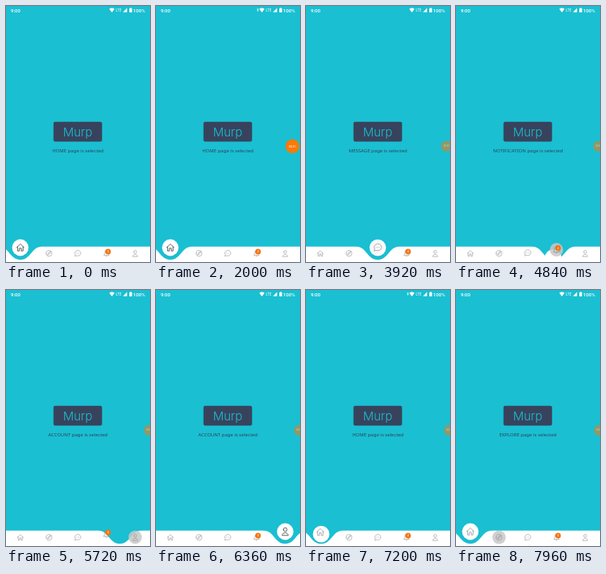
Recreate the animation shown at these times as an HTML page. Size 181 by 320 pixels, loop 8000 ms.

```html
<!DOCTYPE html>
<html lang="en">
<head>
<meta charset="utf-8">
<style>
  html, body { margin: 0; width: 100%; height: 100%; overflow: hidden; background: #1abfd2; }
  svg { display: block; width: 181px; height: 320px; }
  text { text-anchor: middle; }
  .status { font-family: Roboto, sans-serif; font-weight: 500; font-size: 6.2px; fill: #fff; }
  .status .network { font-size: 4.6px; font-weight: 400; }
  .icon { fill: none; stroke-linejoin: round; stroke-linecap: round; }
</style>
</head>
<body>
<svg viewBox="0 0 181 320">
  <defs>
    <filter id="shadow" x="-30%" y="-30%" width="160%" height="160%">
      <feDropShadow dx="0" dy=".5" stdDeviation=".6" flood-opacity=".22"/>
    </filter>
  </defs>
  <rect width="181" height="320" fill="#1abfd2"/>

  <g class="status">
    <text x="12" y="7.6">9:00</text>
    <path id="extra" d="M127 3.8l1.8 2-.9 1V2.8l.9 1-1.8 2" fill="none" stroke="#fff" stroke-width=".5"/>
    <path d="M129.8 3.7Q133.1 1.4 136.4 3.7L133.1 7.9Z"/>
    <text class="network" x="141.6" y="7.2">LTE</text>
    <path d="M147 7.7H152.2V2.4Z"/>
    <path d="M155 3h.9v-.8h1.6v.8h.9v4.9h-3.4Z"/>
    <text x="167.3" y="7.6">100%</text>
  </g>

  <rect x="59.7" y="144.8" width="61" height="24.6" rx="2" fill="#37435c"/>
  <text x="90.2" y="162.5" font-family="Inter, sans-serif" font-size="15" font-weight="300" fill="#1abfd2">Murp</text>
  <text id="label" x="90.4" y="183.3" font-family="Noto Sans, sans-serif" font-size="6" fill="#2d4458"></text>

  <path id="bar" fill="#fff"/>
  <g id="cells"></g>

  <g id="bubble">
    <circle r="8.8" fill="#fb7a08"/>
    <text id="timer" y="1.3" font-family="Roboto, sans-serif" font-size="3.7" fill="#fff"></text>
  </g>
</svg>
<script>
const LOOP = 8000;
const DP = 0.44;
const BASE = 300.8;
const PAGES = ['HOME', 'EXPLORE', 'MESSAGE', 'NOTIFICATION', 'ACCOUNT'];
const ICONS = [
  'M-4.7 .3L0-4.4 4.7 .3M-3.4-.9V4.4H-1.2V1H1.2V4.4H3.4V-.9',
  'M-4.6 0a4.6 4.6 0 1 0 9.2 0a4.6 4.6 0 1 0-9.2 0M2.5-2.5L.9.9-2.5 2.5-.9-.9Z',
  'M-4.4 4.2L-3.9 2A4.7 4.3 0 1 1-1.8 3.7ZM-2.1-.2h.1M0-.2h.1M2-.2h.1',
  'M-3.9 2.8C-2.6 1.6-2.9-.4-2.6-1.6A2.6 2.8 0 0 1 2.6-1.6C2.9-.4 2.6 1.6 3.9 2.8ZM-1 4a1.1 1.1 0 0 0 2 0',
  'M-2.2-2.3a2.2 2.4 0 1 0 4.4 0a2.2 2.4 0 1 0-4.4 0M-3.8 4.6C-3.8 .6 3.8 .6 3.8 4.6Z'
];
// [click time, page]
const CLICKS = [[-5000, 0], [2230, 1], [3620, 2], [4680, 3], [5637, 4], [6715, 0], [7960, 1]];

const $ = id => document.getElementById(id);
const clamp = v => Math.min(1, Math.max(0, v));
const mix = (a, b, f) => a + (b - a) * f;
const cellX = i => 18 + 36.1 * i;

function set(node, attrs) {
  for (const key in attrs) node.setAttribute(key, attrs[key]);
}
function add(parent, tag, attrs) {
  const node = document.createElementNS('http://www.w3.org/2000/svg', tag);
  set(node, attrs);
  return parent.appendChild(node);
}

// cubic-bezier(.4, 0, .2, 1)
function fastOutSlowIn(t) {
  t = clamp(t);
  if (t === 0 || t === 1) return t;
  let lo = 0, hi = 1, u;
  for (let n = 0; n < 22; n++) {
    u = (lo + hi) / 2;
    const x = 1.2 * u * (1 - u) ** 2 + 0.6 * u * u * (1 - u) + u ** 3;
    if (x < t) lo = u; else hi = u;
  }
  return u * u * (3 - 2 * u);
}
const accelDecel = t => (1 - Math.cos(Math.PI * clamp(t))) / 2;

const cells = ICONS.map((d, i) => {
  const circle = add($('cells'), 'circle', { r: 10.4, fill: '#fff' });
  const holder = add($('cells'), 'g', {});
  const ripple = add(holder, 'circle', { r: 8.4, fill: '#c8c8c8' });
  const icon = add(holder, 'path', { d, class: 'icon' });
  if (i === 3) {
    add(holder, 'circle', { cx: 2, cy: -2.2, r: 3.5, fill: '#f9730c' });
    const count = add(holder, 'text', { x: 2, y: -0.8, 'font-size': 4, fill: '#fff', 'font-family': 'Roboto, sans-serif' });
    count.textContent = '4';
  }
  return { circle, holder, ripple, icon };
});

function drawBar(x, progress) {
  const bend = progress <= 1 ? progress : 2 - progress;
  const shoulder = mix(BASE, BASE - 8 * DP, bend);
  const tip = mix(317.2, BASE - 16 * DP, bend);
  const half = 62 * DP, quarter = 31 * DP;
  $('bar').setAttribute('d', `M-30 ${BASE}H${x - half}
    C${x - quarter} ${shoulder} ${x - quarter} ${tip} ${x} ${tip}
    C${x + quarter} ${tip} ${x + quarter} ${shoulder} ${x + half} ${BASE}
    H220V320H-30Z`);
}

function drawCell(i, p, side, ripple) {
  const { circle, holder, ripple: spot, icon } = cells[i];
  const x = cellX(i);
  set(circle, {
    cx: x + (1 - p) * side * 24 * DP,
    cy: 302 + (1 - p) * 72 * DP,
    filter: p > 0.7 ? 'url(#shadow)' : 'none'
  });
  set(holder, { transform: `translate(${x} ${309.2 - 7.4 * p})` });
  set(spot, { opacity: 0.85 * ripple });
  set(icon, {
    transform: `scale(${0.8 + 0.2 * p})`,
    stroke: p === 1 ? '#3a3f45' : '#868686',
    'stroke-width': p === 1 ? 0.8 : 0.65
  });
}

function drawNav(t) {
  let k = CLICKS.length - 1;
  while (CLICKS[k][0] > t) k--;
  const [start, page] = CLICKS[k];
  const prev = k ? CLICKS[k - 1][1] : page;
  const steps = Math.abs(page - prev);
  const duration = 150 + 100 * steps;
  const age = t - start;

  $('label').textContent = PAGES[page] + ' page is selected';
  drawBar(mix(cellX(prev), cellX(page), fastOutSlowIn(age / duration)),
    steps > 1 ? 2 * accelDecel(age / 300) : 0);

  const sideOf = n => n > 0 && CLICKS[n][1] > CLICKS[n - 1][1] ? -1 : 1;
  cells.forEach((_, i) => {
    let p = 0, side = 1;
    if (i === page) {
      p = fastOutSlowIn((age - duration / 4) / duration);
      side = sideOf(k);
    } else if (i === prev) {
      p = 1 - fastOutSlowIn(age / 250);
      side = sideOf(k - 1);
    }
    const ripple = CLICKS.reduce((sum, [time, target]) => target !== i ? sum :
      sum + clamp((t - time + 40) / 40) * clamp((time + 320 - t) / 150), 0);
    drawCell(i, p, side, ripple);
  });
}

function drawBubble(t) {
  const enter = fastOutSlowIn((t - 60) / 460);
  const dock = fastOutSlowIn((t - 2000) / 350);
  const tuck = fastOutSlowIn((t - 4650) / 400);
  set($('bubble'), {
    transform: `translate(${mix(192, 171.5, enter) + 5 * dock + 3.5 * tuck} 175.3) scale(${1 - 0.25 * dock})`,
    opacity: 1 - 0.45 * dock
  });
  $('timer').textContent = '00:0' + Math.max(0, Math.floor((t - 160) / 1000));
}

function frame() {
  const t = performance.now() % LOOP;
  drawNav(t);
  drawBubble(t);
  const extraOn = (t > 300 && t < 3080) || (t > 6620 && t < 7400);
  $('extra').setAttribute('opacity', extraOn ? 1 : 0);
  requestAnimationFrame(frame);
}
frame();
</script>
</body>
</html>
```
